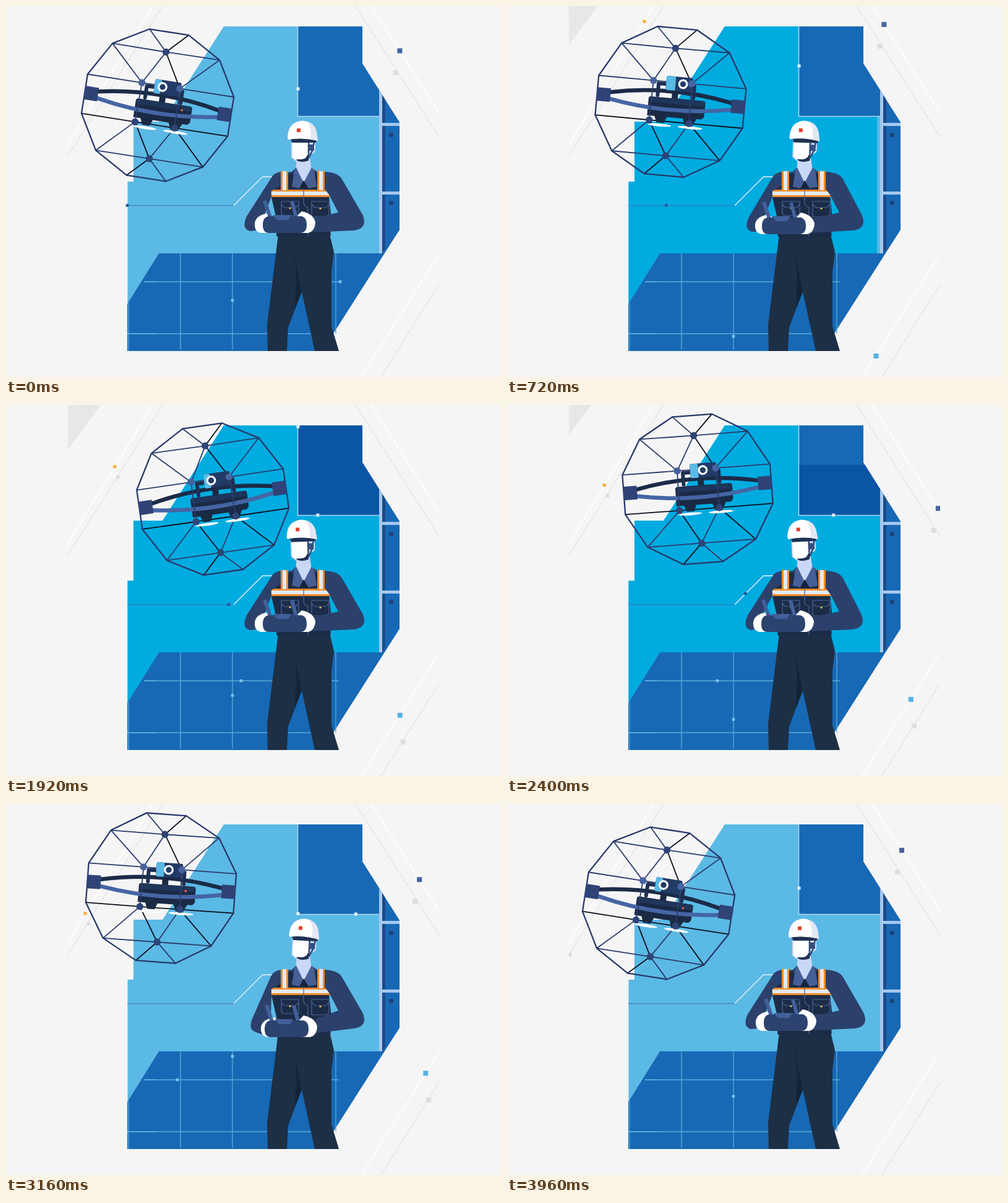
Animation, 800 px wide and 600 px high, one loop 4000 ms. Source, as an HTML page:

```html
<!DOCTYPE html>
<html lang="en">
<head>
<meta charset="utf-8">
<title>Drone inspection</title>
<style>
html, body { margin: 0; width: 100%; height: 100%; overflow: hidden; background: #f5f5f5; }
svg { display: block; width: 800px; height: 600px; }
</style>
</head>
<body>
<svg viewBox="0 0 800 600" fill="none">
  <defs>
    <clipPath id="stage"><path d="M100 0H700V600H100Z"/></clipPath>
    <clipPath id="wall"><path d="M352 33H472V178H603V400H247L196.500 482V284H206V187H253Z"/></clipPath>
    <clipPath id="panel"><path d="M472 33H576V93L603 136V178H472Z"/></clipPath>
    <linearGradient id="fade" x2="1" y2=".6"><stop stop-color="#e8e8e8"/><stop offset="1" stop-color="#e6e6e6"/></linearGradient>
  </defs>

  <g clip-path="url(#stage)">
    <path id="corner" fill="url(#fade)"/>
    <path stroke="#fff" stroke-width="1.6" d="M237 0L100 224M590 0L700 173M574 600L700 401"/>
    <path stroke="#dcdce0" d="M253 0L100 243M565 0L700 212M606 600L700 450"/>
    <g id="squares"></g>
  </g>

  <path fill="#5bb9e5" d="M352 33H472V178H603V400H247L196.500 482V284H206V187H253Z"/>
  <g clip-path="url(#wall)"><rect id="wallWipe" y="33" height="450" fill="#00abe0"/></g>
  <path fill="#1769b5" d="M472 33H576V93L636 188V362L511 558H196V482L247 400H603V178H472Z"/>
  <g clip-path="url(#panel)"><rect id="panelWipe" x="472" width="132" fill="#0b55a5"/></g>
  <path fill="#1d4a88" d="M608 144L613 152V393L608 400Z"/>
  <path fill="#a5c8ef" d="M603 136L608 144V400H603ZM608 189H636V194H608ZM608 300H636V305H608Z"/>
  <g fill="#1c4379"><circle cx="622.500" cy="208.500" r="3.800"/><circle cx="622.500" cy="318.500" r="3.800"/></g>
  <path stroke="#5ba9dc" stroke-width="1.3" d="M223 446H538M196 530H529M198 480V558M282 400V556M366 400V556M533 400V530"/>
  <path stroke="#5ba9dc" stroke-width="2" d="M223 446H243M196 530H243"/>
  <path stroke="#b4d8f3" stroke-width="1.500" d="M471.500 33V178.500H603"/>
  <path stroke="#3f74ad" d="M196 322.800H368"/>
  <path stroke="#e4f0fa" stroke-width="1.400" d="M368 322.800L414.500 276.300H430"/>
  <g id="dots"></g>

  <g id="drone" stroke-linecap="round" stroke-linejoin="round">
    <g id="cage" stroke-width="1.800"></g>
    <path stroke="#1b2b47" stroke-width="6.500" d="M-98 -7Q0 -27 98 -7"/>
    <path stroke="#1f2f52" stroke-width="6" d="M-22 -9V-28H36V-9"/>
    <g fill="#fff"><ellipse cx="-15" cy="39" rx="19" ry="2.300"/><ellipse cx="35" cy="39" rx="20" ry="2.300"/></g>
    <path fill="#1a2a44" d="M1 -20H11V-6H1ZM-32 -6H52Q56 -6 56 -2V20L52 24H44L38 36H26L22 25H-4L-8 35H-20L-24 25H-36V-2Q-36 -6 -32 -6Z"/>
    <path fill="#20355a" d="M-34 -5H54V3H-34Z"/>
    <rect x="-10" y="-41.500" width="43" height="23" rx="3" fill="#223a66"/>
    <rect id="camSide" x="-10" y="-41.500" height="23" rx="2" fill="#5bb9e5"/>
    <circle id="lens" cy="-30.300" r="6.300" fill="#223a66" stroke="#fff" stroke-width="3.200"/>
    <circle id="lamp" cx="40" cy="2" r="1.900" fill="#f0603a"/>
    <path stroke="#4565a4" stroke-width="6.500" d="M-98 4Q0 22 98 4"/>
    <path fill="#2f4377" d="M-120 -13H-98V9H-120ZM98 -13H120V9H98Z"/>
    <g id="nodes"></g>
  </g>

  <path fill="#1d2f45" d="M440 369H523L530 398 526 430V518L538 558H499L478 462 456 520 454 558H423L422 516Z"/>
  <path fill="#142438" d="M466 376L467 410 478 462 467 490 469 440Z"/>
  <path fill="#2b416b" d="M468 262L494 262 503 268 530 272 520 310 525 372H437V345L428 305 436 271 462 268Z"/>
  <path fill="#1c2c47" d="M430 282L462 270 481 295 500 270 520 282 522 308 526 345 523 373H438V345L428 305Z"/>
  <path fill="#c8d8f6" d="M470 246H491L494 266 481 287 468 268Z"/>
  <path fill="#14233a" d="M475 283H487L489 296H473Z"/>
  <path fill="#465f96" d="M469 261L480 284 474 295 462 292 466 266ZM494 261L482 284 489 295 502 292 498 266Z"/>
  <path fill="#f28c28" d="M444 267H456V298H444ZM503 267H515V298H503ZM429 297H521L524 309H428Z"/>
  <path fill="#e4e9f6" d="M447 267H453V298H447ZM506 267H512V298H506ZM429 300H521L522 306H429Z"/>
  <path stroke="#48659c" stroke-width="1.200" d="M481 296V318Q481 323 488 326V372M445 316H473V339H448L445 336ZM445 321L450 326H468L473 321M494 316H522V336L519 341H494ZM494 321L499 326H517L522 321"/>
  <g fill="#f4c64e"><circle cx="459" cy="327" r="1.600"/><circle cx="508" cy="327.500" r="1.600"/></g>

  <path id="leftSleeve" fill="#2b416b"/>
  <path id="rightSleeve" fill="#2b416b"/>
  <path id="leftHand" fill="#fff" d="M402 351Q404 338 424 335L432 342V367H412Q401 365 402 351Z"/>
  <path id="rightHand" fill="#fff" d="M500 350Q497 336 478 332L470 340V367H488Q499 365 500 350Z"/>
  <g id="remote">
    <path stroke="#42609b" stroke-width="6" d="M418 315L428 345M462 316L470 345"/>
    <path fill="#2c436f" d="M425 340H478Q486 342 486 354 486 367 475 367H425Q415 367 415 354 415 341 425 340Z"/>
    <path fill="#42609b" d="M431 338H461L456 346H438Z"/>
  </g>

  <g id="head">
    <path fill="#d3def7" d="M461 215H500V232Q500 238 493 239L489 252H470L461 245Z"/>
    <path fill="#1f3152" d="M469 245L490 240 489 250Q478 254 470 250Z"/>
    <path fill="#fff" d="M463 221H488V237Q487 247 478 248H468Q463 247 463 240Z"/>
    <path fill="#1f3152" d="M460 214H502L501 221H462Z"/>
    <path stroke="#2f4775" stroke-width="2.500" d="M498 220L495 234 489 246M489 220V240"/>
    <path fill="#34507f" d="M490 224H498V234H490Z"/>
    <path fill="#fff" d="M455 213Q456 187 479 185.500 502 187 503 212L504 218Q480 212 456 216Z"/>
    <path fill="#e3e7f3" d="M487 187Q502 191 503 212L504 218 492 215Q495 200 487 187Z"/>
    <rect x="470" y="198" width="6" height="6" fill="#e0432a"/>
  </g>
</svg>

<script>
const LOOP = 4000, STEP = 40;
const $ = id => document.getElementById(id);

function add(parent, tag, attrs) {
  const el = document.createElementNS('http://www.w3.org/2000/svg', tag);
  set(el, attrs);
  parent.append(el);
  return el;
}
function set(el, attrs) {
  for (const key in attrs) el.setAttribute(key, attrs[key]);
}

// Drone cage: a twelve-sided rim joined to six inner nodes.
const rim = angle => {
  const a = angle * Math.PI / 180;
  return [123.8 * Math.cos(a), 123.8 * Math.sin(a)];
};
const nodes = { t: [0, -87], a: [-30.7, -32], b: [31.3, -32], c: [-32, 32.3], d: [32.7, 32.3], e: [0, 87.5] };
const NAVY = '#2b3c6c', BLACK = '#0c101c';
function rods(color, list) {
  const point = key => nodes[key] || rim(+key);
  const d = list.map(([from, to]) => `M${point(from)}L${point(to)}`).join('');
  add($('cage'), 'path', { d, stroke: color });
}
rods(NAVY, [['t', -105], ['t', -135], ['t', -45], ['t', 'a'], ['a', -135], ['a', -165], ['b', -45],
  ['b', -15], ['a', 'b'], ['c', 135], ['d', 'e'], ['e', 135], ['e', 45], ['e', 75]]);
rods(BLACK, [['t', -75], ['t', 'b'], ['c', 165], ['c', 'd'], ['d', 15], ['d', 45], ['c', 'e'], ['e', 105]]);
add($('cage'), 'polygon', {
  points: Array.from({ length: 12 }, (_, i) => rim(15 + 30 * i)).join(' '), stroke: '#27396b', 'stroke-width': 2.3
});
add($('nodes'), 'path', {
  d: `M${nodes.a}L${nodes.c}M${nodes.b}L${nodes.d}`, stroke: NAVY, 'stroke-width': 1.8
});
for (const key in nodes) {
  const [cx, cy] = nodes[key];
  add($('nodes'), 'circle', { cx, cy, r: 5.7, fill: key === 'a' || key === 'b' ? '#47639f' : '#2f4377' });
}

// Monotone cubic through [time, value] pairs, repeating with the loop.
function track(times, values) {
  const n = times.length;
  const at = i => times[(i + n) % n] + LOOP * Math.floor(i / n);
  const val = i => values[(i + n) % n];
  const slope = i => (val(i + 1) - val(i)) / (at(i + 1) - at(i));
  const tangent = i => {
    const p = slope(i - 1), q = slope(i);
    return p * q <= 0 ? 0 : 2 * p * q / (p + q);
  };
  return t => {
    let i = n - 1;
    while (times[i] > t) i--;
    const h = at(i + 1) - at(i), u = (t - at(i)) / h, v = 1 - u;
    return v * v * (1 + 2 * u) * val(i) + u * u * (3 - 2 * u) * val(i + 1)
      + h * u * v * (v * tangent(i) - u * tangent(i + 1));
  };
}
const flight = [0, 720, 1240, 1920, 2400, 2820, 3160, 3400, 3800];
const droneX = track(flight, [245.1, 264.5, 312.9, 334.2, 308.1, 274, 250.6, 246, 245.1]);
const droneY = track(flight, [160.4, 155, 155, 152.2, 136.2, 124, 136, 152, 160.4]);
const droneTilt = track(flight, [8.9, 5.2, -3.5, -8.2, -4.3, 0.2, 4.2, 7, 8.9]);

const pose = [0, 720, 1240, 1920, 2400, 3160, 3800];
const lensX = track(pose, [3.3, 17.4, 1, 1.7, 10.6, 10.3, 3.3]);
const headTilt = track(pose, [0, 2, 4, -2, -2.6, 3.4, 0]);
const remoteX = track(pose, [0, -3, 2, 0, -4, 3, 0]);
const remoteY = track(pose, [0, 2, 8, 0, 0, 10, 0]);

function ease(t, start, end) {
  const u = Math.min(1, Math.max(0, (t - start) / (end - start)));
  return u < 0.5 ? 4 * u ** 3 : 1 - 4 * (1 - u) ** 3;
}

// Small squares, each with a place function that returns null while hidden.
const movers = [];
function mover(layer, size, fill, place) {
  movers.push({ el: add($(layer), 'rect', { width: size, height: size, fill }), size, place });
}
const span = (t, from, to, x, y) => t >= from && t <= to ? [x, y] : null;
const wrap = t => t > 2000 ? t - LOOP : t;
const upLeft = (dx, dy) => t => [636.5 + dx - 0.0377 * wrap(t), 72.5 + dy - 0.0592 * wrap(t)];
const upRight = (dx, dy) => t => [572.4 + dx + 0.0335 * t, 604.5 + dy - 0.0535 * t];
const downLeft = (dx, dy) => t => [249.7 + dx - 0.0385 * t, -19.9 + dy + 0.0623 * t];
mover('squares', 8, '#45649f', upLeft(0, 0));
mover('squares', 8, '#dedee2', upLeft(-7, 35.2));
mover('squares', 8, '#56b2e4', upRight(0, 0));
mover('squares', 8, '#dedee2', upRight(5, 43));
mover('squares', 5, '#f7ae3c', downLeft(0, 0));
mover('squares', 5, '#d9d9de', t => t > 900 ? downLeft(5.3, 17)(t) : null);

mover('dots', 4.5, '#7cc4ee', t => span(t, 0, 3800, 540 - t / 12, 446));
mover('dots', 4.5, '#7cc4ee', t => {
  const y = 396 + (80 + 0.081 * t) % 162;
  return y > 400 && y < 556 ? [366, y] : null;
});
mover('dots', 5, '#e2f2fc', t => span(wrap(t), -860, 1960, 472, 134 - 0.0515 * wrap(t)));
mover('dots', 5, '#e2f2fc', t =>
  span(t, 1240, 3920, 472 + Math.max(0, t - 1280) * 0.0497, 178 + Math.max(0, 1280 - t) * 0.05));
mover('dots', 4.5, '#24569a', t => {
  const bend = Math.max(0, t - 2017) * 0.0455;
  return span(t, 0, 2800, bend ? 368 + bend : 196 + 0.0853 * t, 322.5 - bend);
});

function draw(t) {
  for (const { el, size, place } of movers) {
    const p = place(t);
    set(el, { visibility: p ? 'visible' : 'hidden' });
    if (p) set(el, { x: p[0] - size / 2, y: p[1] - size / 2 });
  }

  const corner = ease(t, 100, 1000) - ease(t, 2013, 2913);
  set($('corner'), { d: `M100 0H${100 + 53 * corner}L100 ${72 * corner}Z` });

  const left = ease(t, 2410, 3130), right = ease(t, 80, 828);
  set($('wallWipe'), { x: 196 + 407 * left, width: 407 * (right - left) });
  const top = ease(t, 2055, 2775), bottom = ease(t, 1000, 1702);
  set($('panelWipe'), { y: 33 + 145 * top, height: 145 * (bottom - top) });

  set($('drone'), { transform: `translate(${droneX(t)} ${droneY(t)}) rotate(${droneTilt(t)})` });
  set($('lens'), { cx: lensX(t) });
  set($('camSide'), { width: 10 + 0.3 * lensX(t) });
  set($('lamp'), { visibility: t < 400 || t > 2700 ? 'visible' : 'hidden' });

  set($('head'), { transform: `rotate(${headTilt(t)} 480 252)` });
  const dx = remoteX(t), dy = remoteY(t), back = Math.min(0, dx), hand = dy + back, low = dy * 0.5;
  set($('remote'), { transform: `translate(${dx} ${dy})` });
  set($('leftHand'), { transform: `translate(${hand} ${dy})` });
  set($('rightHand'), { transform: `translate(${dx} ${dy})` });
  set($('leftSleeve'), {
    d: `M444 268Q432 270 428 279L${389 + dy} ${340 + low}Q${380 + dy} ${360 + low} ${394 + dy} ${364 + low}`
      + `L${404 + hand} ${363 + dy}Q${399 + hand} ${345 + dy} ${418 + hand} ${337 + dy}L429 308 428 300 444 290Z`
  });
  set($('rightSleeve'), {
    d: `M515 268Q537 269 543 280L${576 + back} 337Q${586 + back} 360 ${562 + back} 363`
      + `L${495 + dx} ${366 + low}Q${504 + dx} ${352 + low} ${496 + dx} ${343 + low}L537 334 522 305 515 296Z`
  });
}

const start = performance.now();
function tick() {
  const t = (performance.now() - start) % LOOP;
  draw(Math.floor(t / STEP) * STEP);
  requestAnimationFrame(tick);
}
tick();
</script>
</body>
</html>
```
